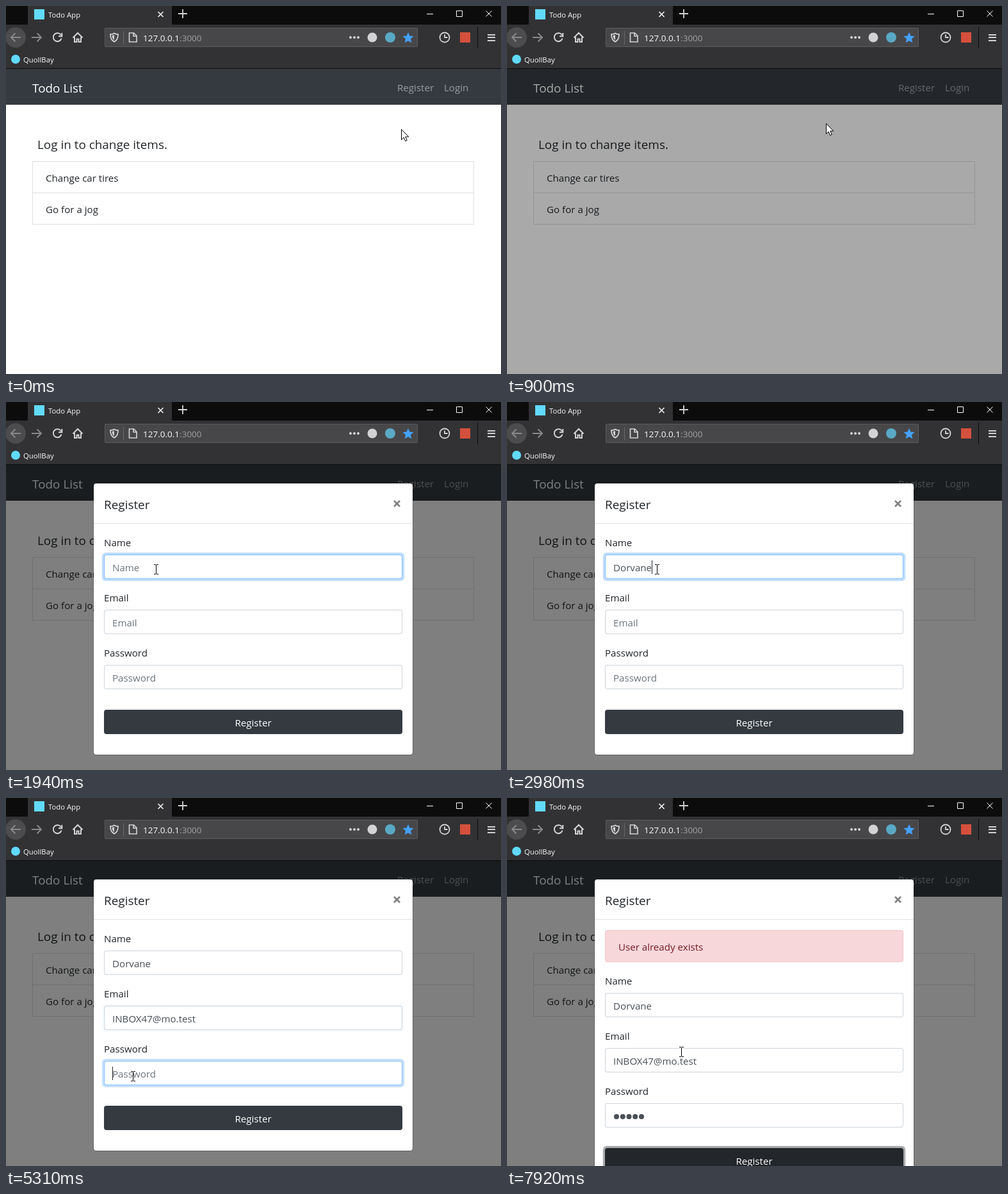
Recreate the animation shown at these times as an HTML page with a canvas. Size 773 px wide and 574 px high, loop 8000 ms.

```html
<!DOCTYPE html>
<html lang="en">
<head>
<meta charset="utf-8">
<title>Todo App</title>
<style>
  html, body { margin: 0; width: 100%; height: 100%; overflow: hidden; background: #fff; }
  canvas { display: block; }
</style>
</head>
<body>
<canvas id="stage" width="773" height="574"></canvas>
<script>
const W = 773, H = 574, LOOP = 8000;
const stage = document.getElementById('stage').getContext('2d');
const layerCanvas = Object.assign(document.createElement('canvas'), { width: W, height: H + 60 });
const layer = layerCanvas.getContext('2d');
let g = stage;

const USER = 'Dorvane', ADDRESS = 'INBOX47@mo.test';
const NAMES = [USER, 'Dorlin', 'Dessa'];
const ADDRESSES = ['inbox@kep.test', ADDRESS, 'INBOX@mo.test', 'INBOX4712@mo.test', 'inbox3@kep.test', 'INBOX@kep.test'];

// keys: the time the caret first shows, then each key press or pick
const FIELDS = [
  { label: 'Name', y: 238, focus: [1420, 2985], keys: [1440, ...Array.from(USER, (_, i) => 2250 + i * 86)], value: n => USER.slice(0, n) },
  { label: 'Email', y: 324, focus: [2985, 5190], keys: [3020, 4680], value: n => n ? ADDRESS : '' },
  { label: 'Password', y: 410, focus: [5190, 6600], keys: [5190, 5560, 5720, 5870, 6080, 6240], value: n => '●'.repeat(n) },
];
const BACKDROP = 800, MODAL = 939, HOVER = 6460, CLICK = 6600, REPLY = 6830, ALERT = 6995, ALERT_HEIGHT = 66;

// time, x, y, and the shape from that time on
const POINTER = [
  [0, 617, 192, 'arrow'], [90, 617, 192, 'arrow'], [330, 628, 168, 'arrow'], [560, 640, 136, 'hand'],
  [700, 641, 130, 'hand'], [790, 638, 129, 'hand'], [830, 595, 145, 'arrow'], [900, 499, 183, 'arrow'],
  [1040, 323, 238, 'beam'], [1070, 285, 250, 'beam'], [1160, 250, 261, 'beam'], [1300, 237, 263, 'beam'],
  [1540, 234, 261, 'beam'], [3830, 234, 261, 'beam'], [3890, 206, 318, 'arrow'], [3980, 112, 386, 'arrow'],
  [4060, 109, 391, 'arrow'], [4220, 165, 388, 'arrow'], [4370, 165, 388, 'arrow'], [4560, 195, 392, 'arrow'],
  [4700, 200, 394, 'arrow'], [4900, 204, 414, 'beam'], [5160, 198, 434, 'beam'], [6240, 198, 434, 'beam'],
  [6370, 206, 455, 'arrow'], [6460, 214, 481, 'hand'], [6640, 224, 494, 'hand'], [6830, 225, 495, 'beam'],
  [7310, 225, 495, 'beam'], [7470, 236, 473, 'arrow'], [7700, 262, 424, 'beam'], [7920, 272, 396, 'beam'], [LOOP, 272, 396, 'beam'],
];

const clamp = v => Math.max(0, Math.min(1, v));
const ramp = (t, start, length = 150) => clamp((t - start) / length);
const smooth = p => p * p * (3 - 2 * p);

function rect(x, y, w, h, color) {
  g.fillStyle = color;
  g.fillRect(x, y, w, h);
}
function round(x, y, w, h, r, color) {
  g.fillStyle = color;
  g.beginPath();
  g.roundRect(x, y, w, h, r);
  g.fill();
}
function circle(x, y, r, color) {
  g.fillStyle = color;
  g.beginPath();
  g.arc(x, y, r, 0, 7);
  g.fill();
}
function stroke(d, color, width = 2, x = 0, y = 0) {
  g.save();
  g.translate(x, y);
  g.strokeStyle = color;
  g.lineWidth = width;
  g.stroke(new Path2D(d));
  g.restore();
}
function text(s, x, y, size, color, align = 'left') {
  g.font = `${size * 0.945}px "Open Sans", "Noto Sans", sans-serif`;
  g.fillStyle = color;
  g.textAlign = align;
  g.fillText(s, x, y);
}
function frame(x, y, w, h, border, fill, r = 0) {
  round(x, y, w, h, r, border);
  round(x + 1, y + 1, w - 2, h - 2, Math.max(0, r - 1), fill);
}

function drawBrowser() {
  const light = '#d2d2d4', dim = '#88888a';
  rect(0, 0, W, 29, '#0c0c0d');
  rect(0, 29, W, 68, '#323234');
  rect(34, 0, 225, 29, '#323234');
  rect(0, 97, W, 1, '#0c0c0d');

  rect(44, 5, 16, 16, '#61dafb');
  text('Todo App', 66, 18, 12, '#f9f9fa');
  stroke('M-4-4L4 4M4-4L-4 4', '#f0f0f0', 1.7, 241.5, 13);
  stroke('M-7 0H7M0-7V7', light, 1.8, 276, 12);
  rect(657, 12, 10, 1, '#fff');
  stroke('M703.5 7.5h9v9h-9z', '#fff', 1);
  stroke('M749.5 7.5l9 9m0-9l-9 9', '#fff', 1);

  circle(15, 49, 16, '#4c4c4e');
  stroke('M23 49H8M14.5 42.5L8 49l6.5 6.5', dim);
  stroke('M40 49H55M48.5 42.5L55 49l-6.5 6.5', dim);
  stroke('M86 45.5a6.5 6.5 0 1 0 .6 5M87.3 42v5.3H82', light);
  stroke('M104.500 49.500L112 42l7.500 7.500M107 48.500V56h3.500v-4.500h3V56h3.500v-7.500', light);

  frame(154, 34, 489, 30, '#5b5b5d', '#474749', 2);
  stroke('M169 42.500c2 1.300 4 1.700 6 1.700 0 5-1 9-6 11.500-5-2.500-6-6.500-6-11.500 2 0 4-.4 6-1.700z', light, 1.8);
  g.fillStyle = light;
  g.fill(new Path2D('M169 45v8c-2.500-1.500-3.300-4-3.400-6.800z'));
  rect(183, 39, 1, 21, '#6a6a6c');
  stroke('M192.500 42h7l4.500 4.500V56h-11.500zM199 42v5h5', light, 1.7);
  text('127.0.0.1', 214, 55, 14.3, '#f9f9fa');
  text(':3000', 214 + g.measureText('127.0.0.1').width, 55, 14.3, '#a0a0a3');
  for (const x of [538, 544, 550]) circle(x, 49, 2, light);
  circle(572, 49, 7.500, light);
  circle(600, 49, 8, '#5aa9c4');
  g.fillStyle = '#45a1ff';
  g.beginPath();
  for (let i = 0; i < 10; i++) {
    const a = i * Math.PI / 5 - Math.PI / 2, r = i % 2 ? 4.2 : 9;
    g.lineTo(628 + r * Math.cos(a), 50 + r * Math.sin(a));
  }
  g.fill();
  stroke('M677.500 49a7.500 7.500 0 1 0 15 0a7.500 7.500 0 1 0-15 0M685 44.500V49h4.500', light, 1.8);
  rect(709, 41, 16, 16, '#d5503c');
  rect(736, 32, 1, 34, '#0c0c0d');
  for (const y of [44, 48, 53]) rect(752, y, 12, 2, light);

  circle(15, 83, 7, '#61dafb');
  text('QuollBay', 27, 88, 12, '#f9f9fa');
}

function drawPage(t) {
  const hover = t > 545 && t < 800 ? 0.75 : 0.5;
  rect(0, 98, W, H - 98, '#fff');
  rect(0, 98, W, 56, '#343a40');
  text('Todo List', 41, 135, 20, '#fff');
  text('Register', 611, 133, 16, `rgba(255,255,255,${hover})`);
  text('Login', 684, 133, 16, 'rgba(255,255,255,.5)');
  text('Log in to change items.', 49, 223, 20, '#212529');
  frame(41, 242, 690, 99, '#dfdfdf', '#fff');
  rect(41, 291, 690, 1, '#dfdfdf');
  text('Change car tires', 62, 274, 16, '#212529');
  text('Go for a jog', 62, 323, 16, '#212529');
  rect(0, 98, W, H - 98, `rgba(0,0,0,${0.5 * ramp(t, BACKDROP)})`);
}

function pressCount(field, t) {
  return field.keys.filter(k => k <= t).length - 1;
}

function drawField(field, t, shift) {
  const { label, y, focus: [start, end], keys, value } = field;
  const top = y + shift, presses = pressCount(field, t);
  const typed = value(Math.max(0, presses));
  const glow = smooth(ramp(t, start)) - smooth(ramp(t, end));
  text(label, 153, top - 13, 16, '#212529');
  if (glow) round(149.8, top - 3.2, 472.4, 44.4, 6, `rgba(0,123,255,${0.25 * glow})`);
  frame(153, top, 466, 38, '#ced4da', '#fff', 4);
  if (glow) stroke(`M156.500 ${top + 0.5}h459q3 0 3 3v31q0 3-3 3h-459q-3 0-3-3v-31q0-3 3-3z`, `rgba(128,189,255,${glow})`, 1);

  let width = 0;
  if (label === 'Password' && typed) {
    width = typed.length * 9.75;
    for (let i = 0; i < typed.length; i++) circle(171 + i * 9.75, top + 21, 4, '#495057');
  } else {
    text(typed || label, 166, top + 26, 16, typed ? '#495057' : '#6c757d');
    if (typed) width = g.measureText(typed).width;
  }
  const caretOn = presses >= 0 && t < end && Math.floor((t - keys[presses]) / 500) % 2 === 0;
  if (caretOn) rect(Math.round(166 + width), top + 9, 1, 21, '#212529');
}

function drawButton(t, shift) {
  const y = 480 + shift, ring = smooth(ramp(t, CLICK)), dark = smooth(ramp(t, HOVER));
  const mix = (a, b) => Math.round(a + (b - a) * dark);
  if (ring) round(149.8, y - 3.2, 472.4, 44.4, 6, `rgba(82,88,93,${0.5 * ring})`);
  round(153, y, 466, 38, 4, `rgb(${mix(52, 35)},${mix(58, 39)},${mix(64, 43)})`);
  text('Register', 386, y + 26, 16, '#fff', 'center');
}

function drawModal(t) {
  if (t < MODAL) return;
  const shift = t >= REPLY ? ALERT_HEIGHT : 0;
  g = layer;
  g.clearRect(0, 0, W, H + 60);
  round(136, 126, 500, 425 + shift, 5, 'rgba(0,0,0,.2)');
  round(137, 127, 498, 423 + shift, 4, '#fff');
  text('Register', 153, 167, 20, '#212529');
  stroke('M-4.500-4.500l9 9m0-9l-9 9', '#7f7f7f', 2.6, 610.5, 158.5);
  rect(137, 189, 498, 1, '#dee2e6');
  for (const field of FIELDS) drawField(field, t, shift);
  drawButton(t, shift);
  if (t > ALERT) {
    g.globalAlpha = ramp(t, ALERT);
    frame(153, 206, 466, 50, '#f5c6cb', '#f8d7da', 4);
    text('User already exists', 174, 238, 16, '#721c24');
    g.globalAlpha = 1;
  }
  g = stage;
  g.globalAlpha = ramp(t, MODAL);
  g.drawImage(layerCanvas, 0, -50 * (1 - ramp(t, MODAL, 300)) ** 1.7);
  g.globalAlpha = 1;
}

function drawList(y, items, selected, scrollbar) {
  const h = items.length * 20 + 2;
  g.save();
  g.shadowColor = 'rgba(0,0,0,.6)';
  g.shadowBlur = 3;
  g.shadowOffsetX = g.shadowOffsetY = 2;
  rect(153, y, 466, h, '#a0a0a0');
  g.restore();
  rect(154, y + 1, 464, h - 2, '#fff');
  items.forEach((item, i) => {
    const on = i === selected;
    if (on) rect(154, y + 1 + i * 20, 464, 20, '#0078d7');
    text(item, 159, y + 16 + i * 20, 12, on ? '#fff' : '#000');
  });
  if (!scrollbar) return;
  rect(602, y + 1, 16, h - 2, '#f0f0f0');
  rect(602, y + 18, 15, 71, '#cdcdcd');
  stroke('M-3.500 2L0-1.500L3.500 2', '#404040', 2, 609.5, y + 10);
  stroke('M-3.500-2L0 1.500L3.500-2', '#404040', 2, 609.5, y + h - 10);
}

function drawSuggestions(t) {
  const typed = USER.slice(0, Math.max(0, pressCount(FIELDS[0], t)));
  if (typed && typed !== USER) drawList(276, NAMES.filter(n => n.startsWith(typed)), -1, false);
  if (t >= 3100 && t < 4680) drawList(362, ADDRESSES, t >= 4370 ? 1 : -1, true);
}

function drawShape(d) {
  const path = new Path2D(d);
  g.fillStyle = '#fff';
  g.strokeStyle = '#000';
  g.lineWidth = 1;
  g.fill(path);
  g.stroke(path);
}

function drawPointer(t) {
  const i = POINTER.findIndex(p => p[0] > t) - 1;
  const [t0, x0, y0, shape] = POINTER[i], [t1, x1, y1] = POINTER[i + 1];
  const p = (t - t0) / (t1 - t0);
  g.save();
  g.translate(Math.round(x0 + (x1 - x0) * p), Math.round(y0 + (y1 - y0) * p));
  if (shape === 'beam') {
    stroke('M-3-7.500H0M1-7.500H4M-3 7.500H0M1 7.500H4M.5-7V7', '#000', 1);
  } else if (shape === 'hand') {
    drawShape('M-1.500 1q1.500-2 3 0v6q1.500-1 3 .5 1.500-1 3 .5 2.500-.5 3 1.500v6l-2 5.500h-8l-5.500-8q0-2 2-1.500l1.500 1.500z');
  } else {
    drawShape('M.5.5v16l3.700-3.500 2.400 5.700 2.600-1.100-2.400-5.600h5z');
  }
  g.restore();
}

function draw(now) {
  const t = now % LOOP;
  drawPage(t);
  drawModal(t);
  drawBrowser();
  drawSuggestions(t);
  drawPointer(t);
}

const begin = performance.now();
function tick() {
  draw(performance.now() - begin);
  requestAnimationFrame(tick);
}
tick();
</script>
</body>
</html>
```
